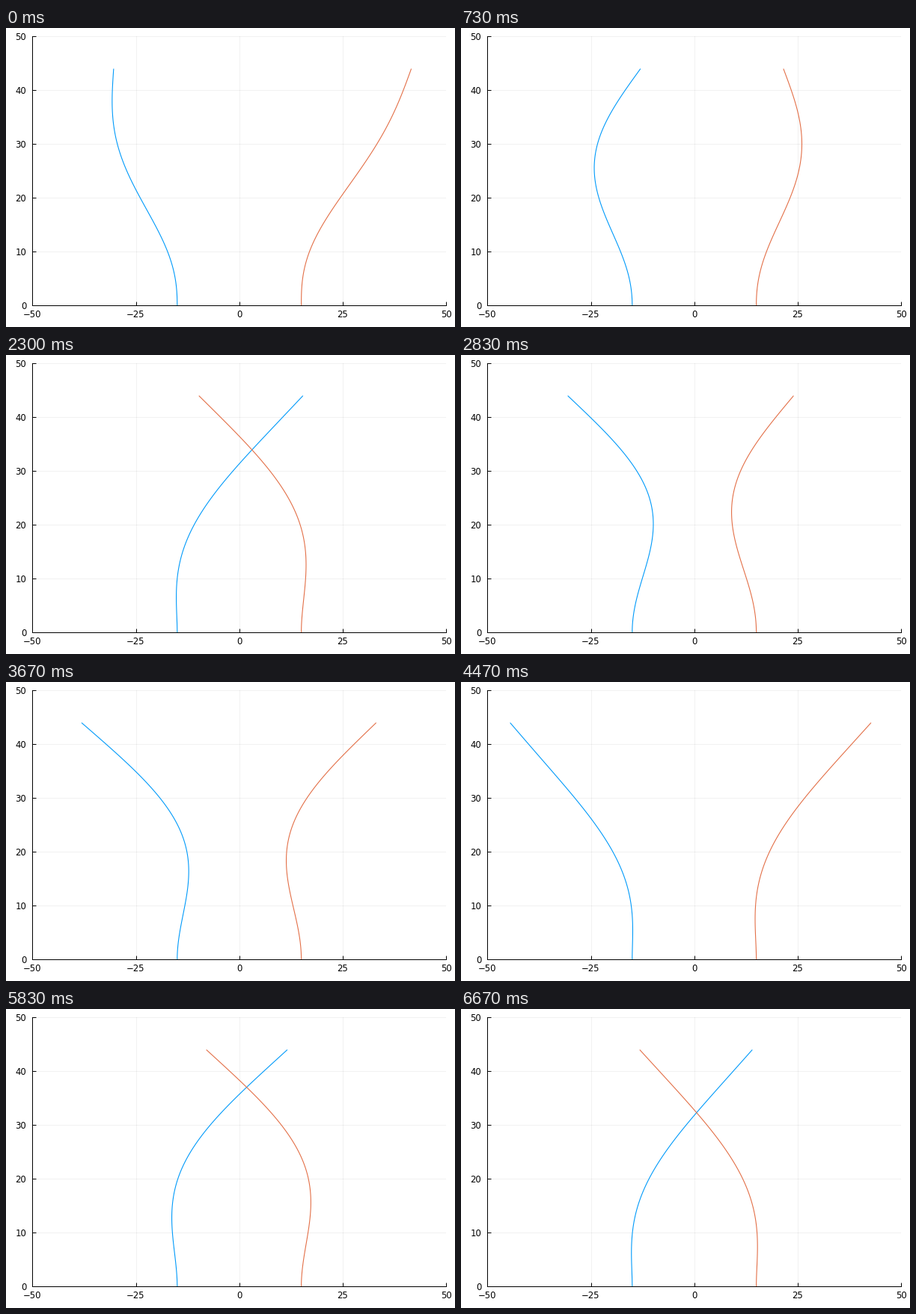
These frames come from a looping animation (600x400 px, 6.71 s). A matplotlib script:

```python
import numpy as np
import matplotlib.pyplot as plt
from matplotlib.animation import FuncAnimation

W, H, DPI = 600, 400, 100
LOOP_MS, TICK_MS = 6710, 22
LAST_STEP = 200  # poses advance at 30 steps per second
PX = 72 / DPI    # points per pixel
LENGTH = 44
SPEED = 13.7     # degrees per step
BLUE, RED = "#009afa", "#e36f47"

plt.rcParams.update({"font.family": "DejaVu Sans", "font.size": 11.6 * PX})

POWERS = np.arange(2, 7)
S = np.linspace(0, 1, 120)
Z = S * LENGTH


def profile(values):
    """Smooth curve clamped at the base and nearly straight at the free tip."""
    s = np.array([10, 20, 30, 40, 44]) / LENGTH
    tip_curvature = 0.01 * POWERS * (POWERS - 1)
    rows = np.vstack([s[:, None] ** POWERS, tip_curvature])
    coef = np.linalg.lstsq(rows, np.append(values, 0), rcond=None)[0]
    return S[:, None] ** POWERS @ coef


IN_PHASE = profile([0.010, 0.155, 0.472, 0.842, 1.0])
QUADRATURE = profile([-0.097, -0.293, -0.323, -0.122, 0.0])

# Slow phase drift in degrees while the two filaments synchronise
KNOTS = [0, 22, 53, 85, 134, 175, 200]
DRIFT_BLUE = [-48.5, -41.3, -44.7, -33.3, -32.6, -35.3, -34.4]
DRIFT_RED = [-22.7, -17.5, -25.6, -21.8, -27.0, -26.2, -31.4]


def bend(n, drift, sign):
    """Outward displacement of one filament at step n."""
    gap = 4.16 * (np.exp(-n / 80) - 1.5 * np.exp(-n / 12))
    amp = 28.8 + sign * gap
    theta = SPEED * n + np.interp(n, KNOTS, drift)
    psi = np.radians(theta + 8 * np.cos(np.radians(2 * (theta - 60))))
    side = np.sin(psi) + 0.07 * np.sin(3 * psi)
    return amp * (IN_PHASE * np.cos(psi) + QUADRATURE * side)


fig = plt.figure(figsize=(W / DPI, H / DPI), dpi=DPI, facecolor="white")
ax = fig.add_axes([35.3 / W, 1 - 371.3 / H, 552.8 / W, 360 / H])
ax.set(xlim=(-50, 50), ylim=(0, 50),
       xticks=range(-50, 51, 25), yticks=range(0, 51, 10))
ax.set_axisbelow(True)
ax.grid(color="black", alpha=0.055, lw=PX)
ax.tick_params(direction="in", length=5 * PX, width=PX)
ax.tick_params(axis="x", pad=6 * PX)
ax.tick_params(axis="y", pad=8 * PX)
for side in ("top", "right"):
    ax.spines[side].set_visible(False)
for side in ("left", "bottom"):
    ax.spines[side].set_linewidth(PX)

blue, = ax.plot([], [], color=BLUE, lw=1.1 * PX, solid_capstyle="butt")
red, = ax.plot([], [], color=RED, lw=1.1 * PX, solid_capstyle="butt")


def draw(k):
    # Show the newest step that begins before this tick ends (+3 ms rounding)
    n = min((TICK_MS * (k + 1) + 3) * 3 // 100, LAST_STEP)
    blue.set_data(-15 - bend(n, DRIFT_BLUE, 1), Z)
    red.set_data(15 + bend(n, DRIFT_RED, -1), Z)
    return blue, red


anim = FuncAnimation(fig, draw, frames=LOOP_MS // TICK_MS, interval=TICK_MS,
                     repeat=True, repeat_delay=0)
plt.show()
```
